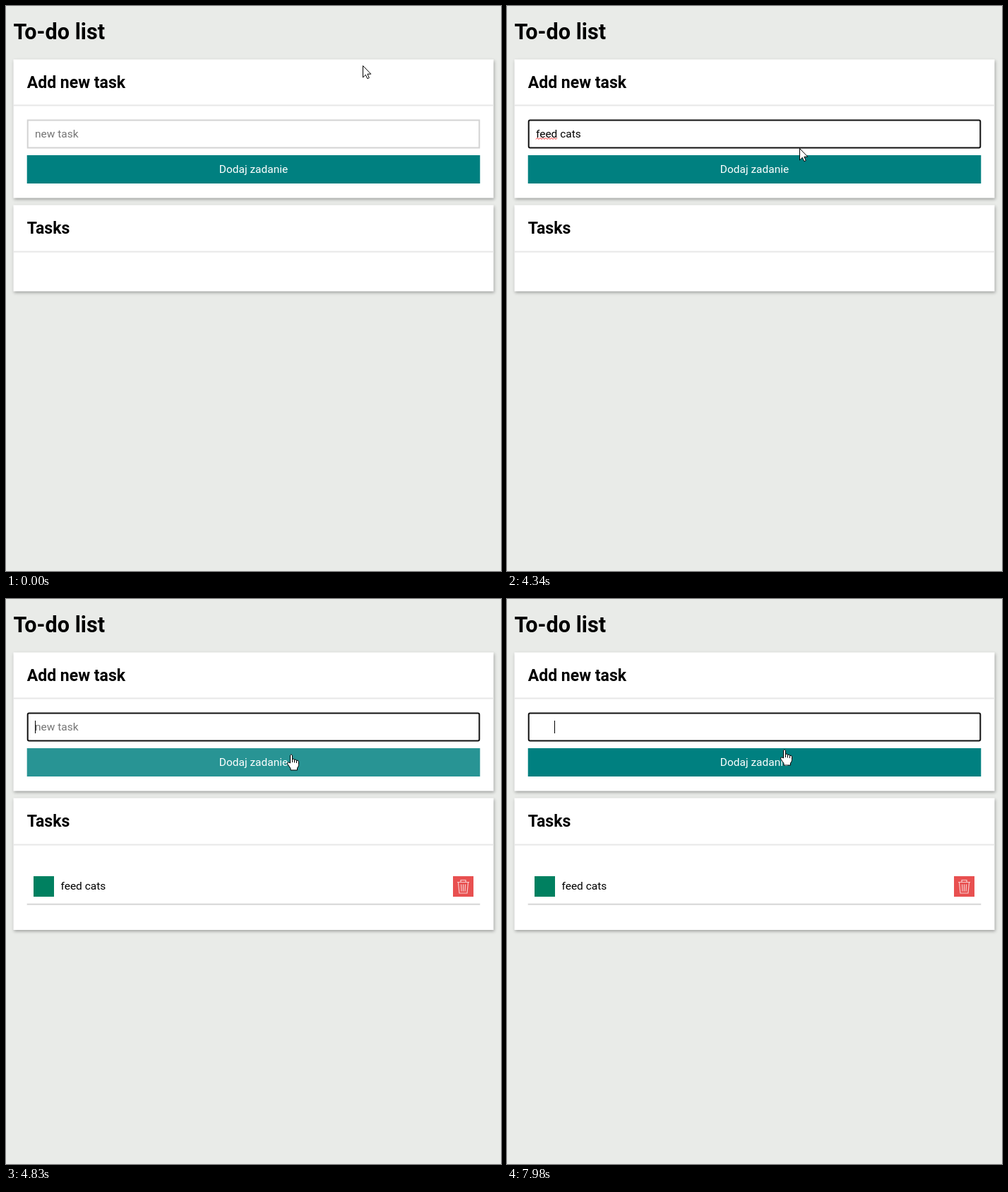
An HTML page that plays this animation: 701 by 799 pixels, repeating every 8 s.

```html
<!DOCTYPE html>
<html lang="en">
<head>
<meta charset="utf-8">
<title>To-do list</title>
<style>
  html, body { margin: 0; width: 100%; height: 100%; overflow: hidden; background: #e9ebe8; }
  svg { display: block; font: 15.47px Roboto, sans-serif; }
  text { white-space: pre; fill: #000; }
  h1, .h1, .h2 { font-weight: 700; }
  .h1 { font-size: 30.6px; }
  .h2 { font-size: 23px; }
  .card { fill: #fff; filter: drop-shadow(1px 2px 2.2px rgba(0, 0, 0, .32)); }
  .line { fill: #e7e7e7; }
  .pointer > * { stroke: #000; fill: #fff; stroke-linejoin: round; }
</style>
</head>
<body>
<svg width="701" height="799" viewBox="0 0 701 799">
  <text class="h1" x="10.500" y="47">To-do list</text>

  <rect class="card" x="10.500" y="75.500" width="680" height="196"/>
  <rect class="line" x="10.500" y="139.500" width="680" height="2"/>
  <text class="h2" x="29.700" y="116">Add new task</text>
  <rect id="field" x="30.700" y="161.500" width="639.600" height="39" fill="#fff" stroke-width="2"/>
  <text id="entry" x="41" y="186"></text>
  <path id="squiggle" fill="none" stroke="#f22" stroke-width="1"/>
  <rect id="caret" y="172" width="1" height="18"/>
  <rect id="button" x="29.700" y="211" width="641.600" height="40" fill="#008080"/>
  <text x="350.500" y="236" text-anchor="middle" style="fill:#fff">Dodaj zadanie</text>

  <rect id="tasks" class="card" x="10.500" y="281.500" width="680"/>
  <rect class="line" x="10.500" y="346.500" width="680" height="2"/>
  <text class="h2" x="29.700" y="322">Tasks</text>
  <g id="task">
    <rect x="39" y="392" width="29" height="29" fill="#008060"/>
    <text x="77.500" y="411">feed cats</text>
    <rect x="633" y="392" width="29" height="29" fill="#e85050"/>
    <g fill="none" stroke="#f8cccc" stroke-width="1.200">
      <path d="M639 400.500h17M644 400v-2.500h7v2.500M640.500 401l1.500 15h11l1.500-15"/>
      <path d="M644.500 403.500l.5 10M647.500 403.500v10M650.500 403.500l-.5 10"/>
    </g>
    <rect x="29.700" y="430.700" width="641.600" height="2" fill="#d5d5d5"/>
  </g>

  <g id="pointer">
    <circle id="click" r="12" fill="#ff0" fill-opacity=".52"/>
    <g class="pointer" id="arrow">
      <path d="M.5 .5V17L4.300 13.300L6.800 18.700L9.300 17.600L6.900 12.200H11.800Z"/>
    </g>
    <g class="pointer" id="beam">
      <path d="M-3 -6.500H-1L.5 -5.500L2 -6.500H4M.5 -5.500V6.500M-3 7.500H-1L.5 6.500L2 7.500H4" style="fill:none"/>
    </g>
    <g class="pointer" id="hand">
      <path d="M-1.500 13V2Q0 -.5 1.500 2V7.500Q3.800 6.200 4.500 8.300Q6.700 7.200 7.500 9.300Q10.300 8.600 10.500 11V15.500Q10.500 18 8.500 20V23H-1V20.500L-5.300 14.300Q-6 11.300 -3.300 12Z"/>
      <path d="M1.500 7V12M4.500 8V12.500M7.500 9V13" style="fill:none"/>
    </g>
  </g>
</svg>
<script>
const $ = id => document.getElementById(id);
const LOOP = 8000, STEP = 70, BLINK = 530;
const TEXT_X = 41, FIRST = 'feed cats', ADDED = 4830;
const wordKeys = [2240, 2450, 2660, 2800, 2940, 3150, 3290, 3430, 3570];
const spaceKeys = [6650, 6790, 6930, 7140, 7280, 7420, 7560];

// pointer path: time, x, y
const path = [
  [0, 505, 84], [210, 499, 96], [1050, 499, 96], [1610, 422, 180],
  [4060, 422, 180], [4340, 414, 201], [4410, 404, 219], [5670, 404, 219],
  [5880, 402, 200], [6090, 402, 181], [7840, 402, 181], [7980, 393, 212]
];

const pen = document.createElement('canvas').getContext('2d');
pen.font = '15.47px Roboto, sans-serif';

const within = (t, a, b) => t >= a && t < b;
const show = (id, on) => $(id).style.display = on ? '' : 'none';
const set = (id, attrs) => {
  for (const name in attrs) $(id).setAttribute(name, attrs[name]);
};

function pointerAt(t) {
  const next = path.findIndex(p => p[0] > t);
  if (next < 1) return path[next < 0 ? path.length - 1 : 0].slice(1);
  const [t0, x0, y0] = path[next - 1], [t1, x1, y1] = path[next];
  const k = (t - t0) / (t1 - t0);
  return [Math.round(x0 + (x1 - x0) * k), Math.round(y0 + (y1 - y0) * k)];
}

function shapeAt(t) {
  const y = pointerAt(t)[1];
  return within(y, 160, 201) ? 'beam' : within(y, 211, 251) ? 'hand' : 'arrow';
}

function drawField(t) {
  const added = t >= ADDED;
  const typed = (added ? spaceKeys : wordKeys).filter(k => k <= t);
  const text = added ? ' '.repeat(typed.length) : FIRST.slice(0, typed.length);
  const focused = within(t, 1680, 4690) || added;
  const blinkStart = typed.length ? typed[typed.length - 1] : added ? 4790 : 1680;

  set('field', { stroke: focused ? '#101010' : '#d3d3d3', rx: focused ? 2 : 0 });
  $('entry').textContent = text || 'new task';
  $('entry').style.fill = text ? '#000' : '#757575';
  set('caret', { x: Math.floor(TEXT_X + pen.measureText(text).width) });
  show('caret', focused && Math.floor((t - blinkStart) / BLINK) % 2 === 0);
  show('squiggle', focused && !added && text.length > 4);
}

function draw(now) {
  const t = Math.floor(now % LOOP / STEP) * STEP;
  drawField(t);

  const pressed = within(t, 4690, ADDED);
  const hovered = shapeAt(t) === 'hand' && shapeAt(Math.max(0, t - STEP)) === 'hand';
  set('button', { 'fill-opacity': pressed ? .7 : hovered ? .845 : 1 });

  show('task', t >= ADDED);
  set('tasks', { height: t >= ADDED ? 186.5 : 122 });

  set('pointer', { transform: `translate(${pointerAt(t)})` });
  for (const shape of ['arrow', 'beam', 'hand']) show(shape, shape === shapeAt(t));
  show('click', pressed || within(t, 1680, 1750));
  requestAnimationFrame(draw);
}

set('squiggle', { d: 'M41 188.500' + 'l2 -2l2 2'.repeat(7) + 'l2 -2' });
draw(0);
</script>
</body>
</html>
```
